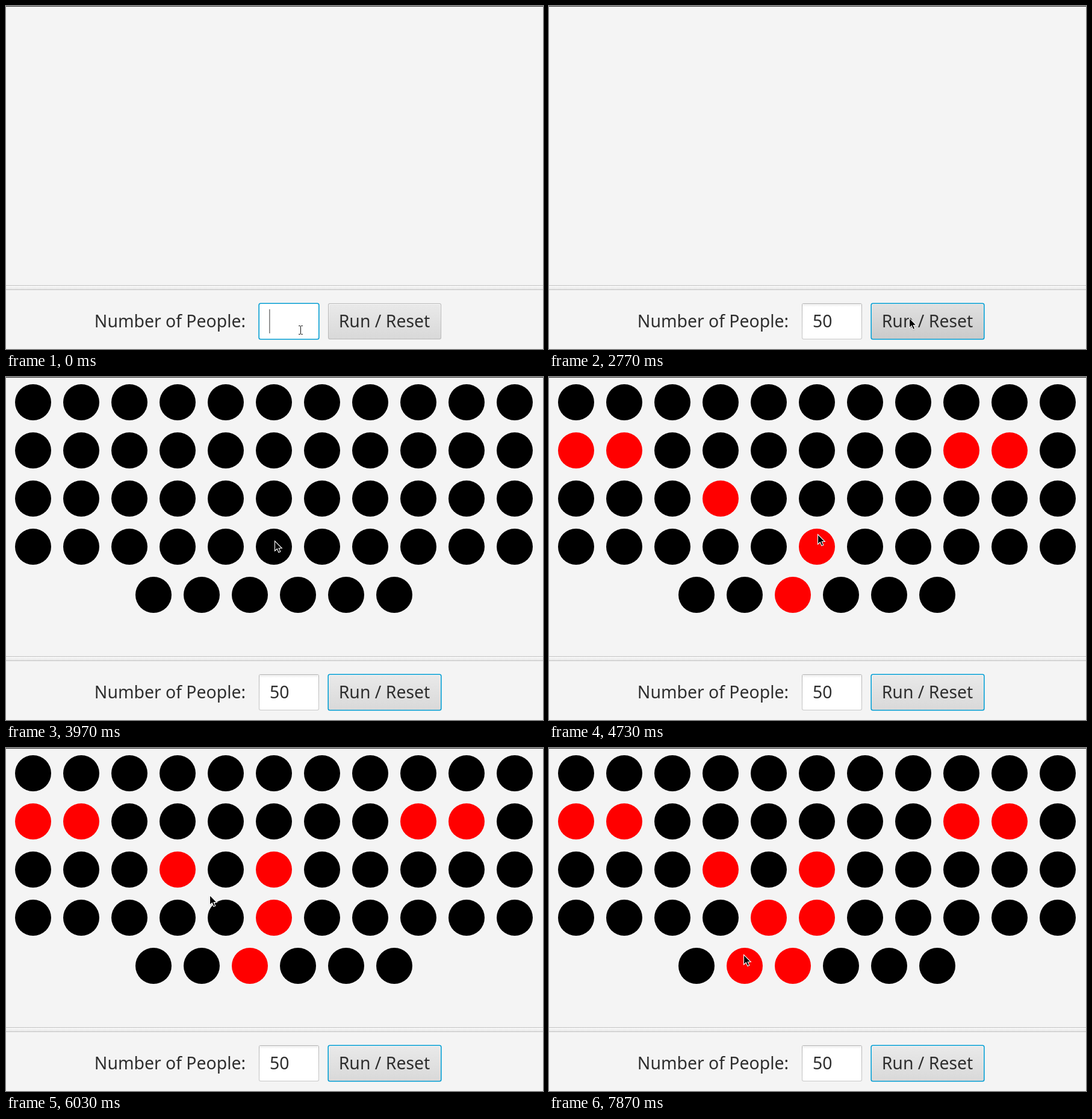
Recreate the animation shown at these times as an HTML page with a canvas. Size 892 by 570 pixels, loop 8 s.

```html
<!DOCTYPE html>
<html lang="en">
<head>
<meta charset="utf-8">
<title>Number of People</title>
<style>
  html, body { margin: 0; width: 100%; height: 100%; overflow: hidden; background: #f4f4f4; }
  canvas { display: block; }
</style>
</head>
<body>
<canvas id="stage" width="892" height="570"></canvas>
<script>
const ctx = document.getElementById('stage').getContext('2d');
const LOOP = 8000;
const FIELD = { x: 420, y: 494, w: 100, h: 60 };
const BUTTON = { x: 535, y: 494, w: 188, h: 60 };
const PRESS = 2770, RELEASE = 3030;

// Pointer waypoints: time, x, y
const PATH = [
  [0, 489, 538], [2230, 489, 538], [2430, 598, 518], [3600, 598, 518],
  [3870, 446, 254], [3970, 446, 272], [4460, 446, 272], [4470, 447, 271],
  [4650, 447, 271], [5130, 440, 143], [5400, 433, 195], [5680, 433, 195],
  [6130, 324, 251], [6580, 324, 251], [6740, 347, 268], [7180, 347, 268],
  [7720, 323, 343], [LOOP, 323, 343]
];

// Time at which a circle turns red, keyed by "row,column"
const RED_AT = {
  '1,0': 4300, '1,1': 4300, '1,8': 4300, '1,9': 4300, '2,3': 4300, '3,5': 4300, '4,2': 4300,
  '2,5': 5600, '3,4': 6900, '4,1': 7870
};

function pointerAt(t) {
  const i = PATH.findIndex(p => p[0] > t);
  const [t0, x0, y0] = PATH[i - 1], [t1, x1, y1] = PATH[i];
  const k = (t - t0) / (t1 - t0), e = k * k * (3 - 2 * k);
  return { x: Math.round(x0 + (x1 - x0) * e), y: Math.round(y0 + (y1 - y0) * e) };
}

const inside = (p, b) => p.x >= b.x && p.x < b.x + b.w && p.y >= b.y && p.y < b.y + b.h;

function vertical(y0, y1, ...colors) {
  const g = ctx.createLinearGradient(0, y0, 0, y1);
  colors.forEach((c, i) => g.addColorStop(i / (colors.length - 1), c));
  return g;
}

function rect(x, y, w, h, fill) {
  ctx.fillStyle = fill;
  ctx.fillRect(x, y, w, h);
}

function rounded(b, inset, radius, fill) {
  ctx.beginPath();
  ctx.roundRect(b.x + inset, b.y + inset, b.w - 2 * inset, b.h - 2 * inset, radius);
  ctx.fillStyle = fill;
  ctx.fill();
}

function text(str, x) {
  ctx.font = '28.4px "Noto Sans", "Open Sans", sans-serif';
  ctx.fillStyle = '#2e2e2e';
  ctx.fillText(str, x, 534);
}

function drawFrame() {
  rect(0, 0, 892, 570, '#f4f4f4');
  rect(0, 0, 892, 1, '#343434');
  rect(0, 1, 892, 1, '#e2e2e2');
  rect(0, 464, 892, 8, '#c3c3c3');
  rect(0, 465, 892, 6, vertical(465, 471, '#fafafa', '#e6e6e6'));
}

function drawCircles(t) {
  for (let i = 0; i < 50; i++) {
    const row = Math.floor(i / 11), col = i % 11;
    ctx.beginPath();
    ctx.arc((row === 4 ? 245 : 45) + 80 * col, 42 + 80 * row, 30, 0, 2 * Math.PI);
    ctx.fillStyle = t >= RED_AT[row + ',' + col] ? '#f00' : '#000';
    ctx.fill();
  }
}

function drawField(t) {
  const focused = t < PRESS;
  if (focused) {
    rounded(FIELD, -0.6, 3.5, '#039ed3');
    rounded(FIELD, 1, 2, '#fff');
  } else {
    rounded(FIELD, 0, 3, vertical(494, 554, '#b4b4b4', '#c8c8c8'));
    rounded(FIELD, 1, 2, '#fff');
    rect(421, 495, 98, 5, vertical(495, 500, '#ececec', '#fff'));
  }
  const typed = t < 1670 ? '' : t < 1770 ? '5' : '50';
  text(typed, 438);
  const caretOn = t < 470 || (t >= 970 && t < 1470) || (t >= 1670 && t < 2270);
  if (caretOn) rect(437.4 + 16 * typed.length, 504, 1, 40, '#333');
}

function drawButton(t, pointer) {
  const pressed = t >= PRESS && t < RELEASE;
  const [top, bottom] = pressed ? ['#e0e0e0', '#cbcbcb']
    : inside(pointer, BUTTON) ? ['#f0f0f0', '#dfdfdf'] : ['#e9e9e9', '#d9d9d9'];
  if (t >= PRESS) rounded(BUTTON, -0.6, 3.5, '#039ed3');
  else rounded(BUTTON, 0, 3, '#b7b7b7');
  rounded(BUTTON, 1, 2, vertical(495, 553, pressed ? '#ececec' : '#f8f8f8', bottom));
  rounded(BUTTON, 2, 1.5, vertical(496, 552, top, bottom));
  text('Run / Reset', 552.7);
}

function drawIBeam({ x, y }) {
  rect(x - 1, y - 6, 3, 13, '#fff');
  rect(x, y - 6, 1, 13, '#111');
  for (const edge of [y - 7, y + 7]) {
    rect(x - 3, edge, 3, 1, '#222');
    rect(x + 1, edge, 3, 1, '#222');
  }
}

function drawArrow({ x, y }) {
  ctx.save();
  ctx.translate(x + 0.5, y + 0.5);
  const arrow = new Path2D('M0 0V16.5L3.8 13L6.4 19L9.3 17.8L6.7 12H11.8Z');
  ctx.shadowColor = 'rgba(0,0,0,.3)';
  ctx.shadowBlur = 2;
  ctx.shadowOffsetY = 1;
  ctx.fillStyle = '#000';
  ctx.fill(arrow);
  ctx.shadowColor = 'transparent';
  ctx.strokeStyle = '#fff';
  ctx.lineWidth = 1.1;
  ctx.stroke(arrow);
  ctx.restore();
}

function render(now) {
  const t = now % LOOP;
  const pointer = pointerAt(t);
  drawFrame();
  if (t >= RELEASE) drawCircles(t);
  text('Number of People:', 146.8);
  drawField(t);
  drawButton(t, pointer);
  (inside(pointer, FIELD) ? drawIBeam : drawArrow)(pointer);
  requestAnimationFrame(render);
}
requestAnimationFrame(render);
</script>
</body>
</html>
```
